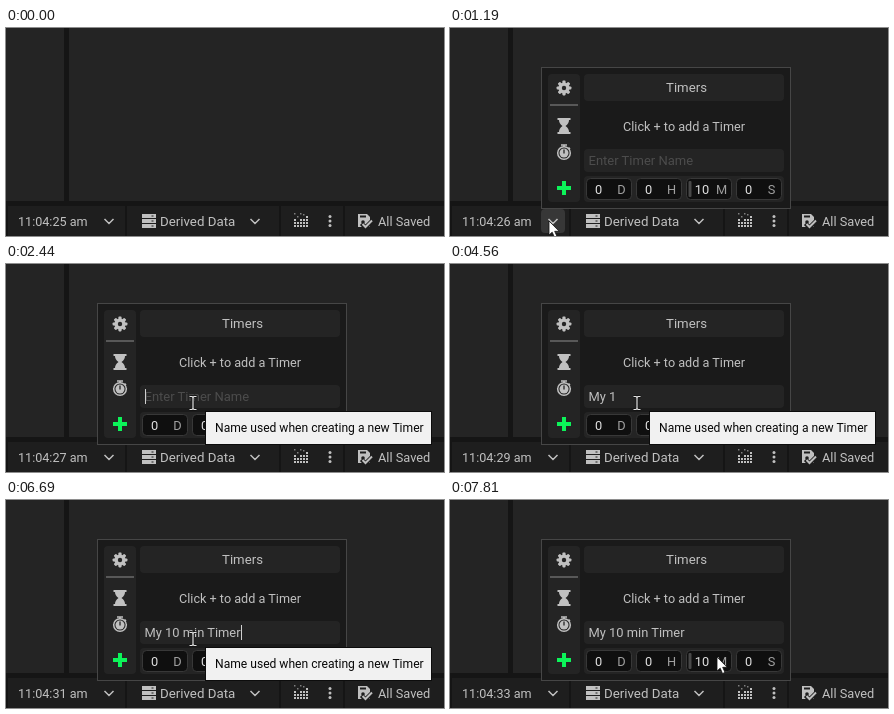
These frames come from a looping animation (438 by 208 pixels, 8 s). An HTML page:

```html
<!DOCTYPE html>
<html lang="en">
<head>
<meta charset="utf-8">
<title>Editor clock timers</title>
<style>
html, body { margin: 0; width: 100%; height: 100%; overflow: hidden; background: #151515; }
svg { display: block; width: 438px; height: 208px; }
text { font: 12.8px Roboto, "Noto Sans", sans-serif; fill: #c0c0c0; white-space: pre; }
.mid { text-anchor: middle; }
.panel { fill: #242424; }
.bar { fill: #1e1e1e; }
.icon { fill: #c0c0c0; }
.line { fill: none; stroke: #c0c0c0; stroke-width: 1.5; }
.rule { fill: #585858; }
.field { fill: #0f0f0f; stroke: #383838; }
.field.hot { stroke: #5c5c5c; }
.tip rect { fill: #f1f1f1; stroke: #0c0c0c; }
.tip text { font-size: 12.1px; fill: #080808; }
.mouse { fill: #fff; stroke: #111; stroke-width: .8; }
</style>
</head>
<body>
<svg viewBox="0 0 438 208">
  <g class="panel">
    <rect width="58" height="173"/>
    <rect x="63" width="375" height="173"/>
  </g>
  <g class="bar">
    <rect x="2" y="178" width="117" height="30"/>
    <rect x="121" y="178" width="152" height="30"/>
    <rect x="275" y="178" width="62" height="30"/>
    <rect x="339" y="178" width="99" height="30"/>
  </g>
  <rect id="hover" x="91" y="181" width="24" height="24" rx="4" fill="#373737"/>
  <text id="clock" x="12" y="198" style="font-size:12.6px"></text>
  <path class="line" d="M98.500 191l4.500 4.500 4.500-4.500M244.500 191l4.500 4.500 4.500-4.500"/>
  <g class="icon">
    <path d="M136 186h14v4h-14zM136 191h14v4h-14zM136 196h14v4h-14z"/>
    <path fill="#1e1e1e" d="M145.500 187.500h2v1h-2zM145.500 192.500h2v1h-2zM145.500 197.500h2v1h-2z"/>
  </g>
  <text x="154" y="198" style="font-size:13.3px">Derived Data</text>
  <g id="dots" class="icon"></g>
  <g class="icon">
    <circle cx="324" cy="188.500" r="1.500"/>
    <circle cx="324" cy="193" r="1.500"/>
    <circle cx="324" cy="197.500" r="1.500"/>
    <path d="M352 186h9l3 3v10h-12z"/>
    <path fill="#1e1e1e" d="M354 187.500h6v2h-6z"/>
    <circle cx="357" cy="194" r="1.800" fill="#1e1e1e"/>
    <path d="M355.500 195.500l4 4 7-7" fill="none" stroke="#1e1e1e" stroke-width="4.500"/>
    <path class="line" d="M356.500 196l3 3 6.500-6.500" style="stroke-width:2"/>
  </g>
  <text x="372" y="198">All Saved</text>

  <g id="popup">
    <rect x="91.500" y="39.500" width="249" height="141" fill="#1a1a1a" stroke="#464646"/>
    <g class="panel">
      <rect x="98" y="46" width="32" height="128" rx="4"/>
      <rect x="134" y="46" width="200" height="27" rx="4"/>
      <rect x="134" y="121" width="200" height="23" rx="4"/>
      <rect x="134" y="148" width="200" height="26" rx="4"/>
    </g>
    <rect class="rule" x="100" y="76" width="28" height="2"/>
    <g id="gear" class="icon" transform="translate(114 60)">
      <circle r="5.600"/>
    </g>
    <path class="icon" d="M107.500 90h13v2h-1.500q0 3.500-3.500 6 3.500 2.500 3.500 6h1.500v2h-13v-2h1.500q0-3.500 3.500-6-3.500-2.500-3.500-6h-1.500z"/>
    <circle class="line" cx="114" cy="125" r="6.300"/>
    <circle class="icon" cx="114" cy="125" r="4.500"/>
    <path d="M114 121.500v4" stroke="#242424" stroke-width="1.300"/>
    <path class="line" d="M111 117h6M114 117v2M118.500 119.500l1.500 1.500"/>
    <path d="M114 153v14M107 160h14" stroke="#0cf359" stroke-width="4"/>
    <text class="mid" x="236.500" y="64" style="font-size:13.2px">Timers</text>
    <text class="mid" x="234" y="103" style="font-size:12.65px">Click + to add a Timer</text>
    <text id="hint" x="138.500" y="137" style="fill:#4c4c4c;font-size:13px">Enter Timer Name</text>
    <text id="name" x="138.500" y="137" style="font-size:12.9px"></text>
    <rect id="caret" y="125" width="1" height="15" fill="#d0d0d0"/>
    <g id="fields"></g>
  </g>

  <g id="clockTip" class="tip">
    <rect x="111.500" y="175.500" width="150" height="31"/>
    <text x="121" y="195">Open/Close Editor Clock</text>
  </g>
  <g id="nameTip" class="tip">
    <rect x="199.500" y="147.500" width="226" height="33"/>
    <text x="209" y="168">Name used when creating a new Timer</text>
  </g>

  <g id="mouse" class="mouse">
    <path id="arrow" d="M0 0V14L3.200 11.200 5.500 16.500 8 15.400 5.700 10.300H10.200Z"/>
    <g id="beam" fill="none" transform="translate(0 1.500)">
      <path d="M-3.500-6h2.500l1 1 1-1h2.500M0-5v11M-3.500 7h2.500l1-1 1 1h2.500" stroke="#111" stroke-width="2.600"/>
      <path d="M-3.500-6h2.500l1 1 1-1h2.500M0-5v11M-3.500 7h2.500l1-1 1 1h2.500" stroke="#e4e4e4" stroke-width="1.200"/>
    </g>
    <path id="resize" d="M-10.500 0l4.500-4.500v3.400h12v-3.400l4.500 4.500-4.500 4.500v-3.400h-12v3.400z"/>
  </g>
</svg>
<script>
const LOOP = 8000, TICK = 62.5;
const NS = "http://www.w3.org/2000/svg";
const $ = id => document.getElementById(id);

function add(parent, tag, attrs, label) {
  const el = document.createElementNS(NS, tag);
  for (const key in attrs) el.setAttribute(key, attrs[key]);
  if (label) el.textContent = label;
  parent.append(el);
  return el;
}

for (let i = 0; i < 8; i++)
  add($("gear"), "rect", { x: -1.6, y: -7.4, width: 3.2, height: 4, rx: 0.8, transform: `rotate(${i * 45})` });
add($("gear"), "circle", { r: 2.2, fill: "#242424" });

// Dot columns of the trace icon: each grows from the bottom, with stray dots above.
[3, 2, 3, 3, 4].forEach((count, col) => {
  for (let row = 0; row < count; row++)
    add($("dots"), "rect", { x: 288 + col * 3, y: 197 - row * 3, width: 2, height: 2 });
});
[[288, 185], [291, 188], [294, 185], [297, 186]].forEach(([x, y]) =>
  add($("dots"), "rect", { x, y, width: 1.5, height: 1.5, opacity: 0.6 }));

const fields = ["D", "H", "M", "S"].map((unit, i) => {
  const x = 136.5 + i * 50, g = $("fields");
  const box = add(g, "rect", { class: "field", x, y: 150.5, width: 45, height: 21, rx: 4 });
  if (unit === "M") add(g, "rect", { x: x + 2, y: 153, width: 3, height: 16, rx: 1, fill: "#484848" });
  const value = add(g, "text", { class: "mid", x: x + (unit === "M" ? 15.5 : 12), y: 166 }, unit === "M" ? "10" : "0");
  value.style.fill = "#e0e0e0";
  add(g, "text", { class: "mid", x: x + 35, y: 166 }, unit).style.fill = "#a0a0a0";
  return { x, box };
});

// Keys are [tick, ...values].
const path = [
  [2, 408, 140], [4, 310, 160], [6, 205, 176], [8, 125, 190], [10, 99, 193],
  [22, 99, 193], [24, 108, 186], [26, 129, 170], [29, 173, 152], [32, 251, 152],
  [34, 251, 152], [35, 225, 141], [37, 195, 137], [39, 187, 137],
  [107, 187, 137], [109, 204, 126], [111, 222, 112], [113, 236, 114],
  [116, 258, 138], [119, 267, 157]
];
const clockFade = [[10, 0], [11, .25], [12, .5], [13, .74], [14, 1], [16, 1], [19, 0]];
const nameFade = [[36, 0], [38, .7], [39, 1], [109, 1], [113, 0]];
const typed = [
  [54, "M"], [60, "My"], [61, "My "], [69, "My 1"], [74, "My 10"], [77, "My 10 "],
  [79, "My 10 m"], [85, "My 10 min "], [90, "My 10 min T"], [93, "My 10 min Ti"],
  [94, "My 10 min Tim"], [95, "My 10 min Timer"]
];

function at(keys, k) {
  if (k <= keys[0][0]) return keys[0].slice(1);
  const i = keys.findIndex(key => key[0] > k);
  if (i < 0) return keys[keys.length - 1].slice(1);
  const [a, b] = [keys[i - 1], keys[i]];
  const p = (k - a[0]) / (b[0] - a[0]);
  return a.slice(1).map((v, j) => v + (b[j + 1] - v) * p);
}

// The picture steps 16 times a second, with starts rounded to 10 ms.
function tickAt(t) {
  const next = Math.floor(t / TICK) + 1;
  return 10 * Math.round(next * TICK / 10) <= t ? next : next - 1;
}

function caretOn(k, lastKey) {
  if (k < 39 || k >= 115) return false;
  if (!lastKey) return k < 50;
  const age = k - lastKey;
  return age < 4 || Math.floor((age - 4) / 8) % 2 === 1;
}

const show = (id, on) => { $(id).style.display = on ? "" : "none"; };

function drawName(k) {
  const [lastKey, value] = typed.filter(key => key[0] <= k).pop() || [0, ""];
  $("name").textContent = value;
  show("hint", !value);
  const width = value ? $("name").getComputedTextLength() : 0;
  $("caret").setAttribute("x", 139 + Math.round(width));
  show("caret", caretOn(k, lastKey));
}

function drawMouse(k) {
  const [x, y] = at(path, k);
  const open = k >= 14;
  const beam = open && y > 121 && y < 145;
  const resize = open && y > 149 && y < 172 && x > 134 && k < 124;
  show("mouse", k >= 2);
  show("beam", beam);
  show("resize", resize);
  show("arrow", !beam && !resize);
  $("mouse").setAttribute("transform", `translate(${x} ${y})`);
  show("hover", k >= 2 && x >= 91 && x < 115 && y > 181);
  for (const f of fields)
    f.box.classList.toggle("hot", resize && x >= f.x && x <= f.x + 45);
  $("nameTip").setAttribute("transform", `translate(${x - 187} ${y - 137})`);
}

function draw(t) {
  const k = tickAt(t);
  $("clock").textContent = `11:04:${25 + Math.floor((k + 3) / 16)} am`;
  show("popup", k >= 14);
  drawName(k);
  drawMouse(k);
  $("clockTip").setAttribute("opacity", at(clockFade, k)[0]);
  $("nameTip").setAttribute("opacity", at(nameFade, k)[0]);
}

const start = performance.now();
function frame() {
  draw((performance.now() - start) % LOOP);
  requestAnimationFrame(frame);
}
frame();
</script>
</body>
</html>
```
